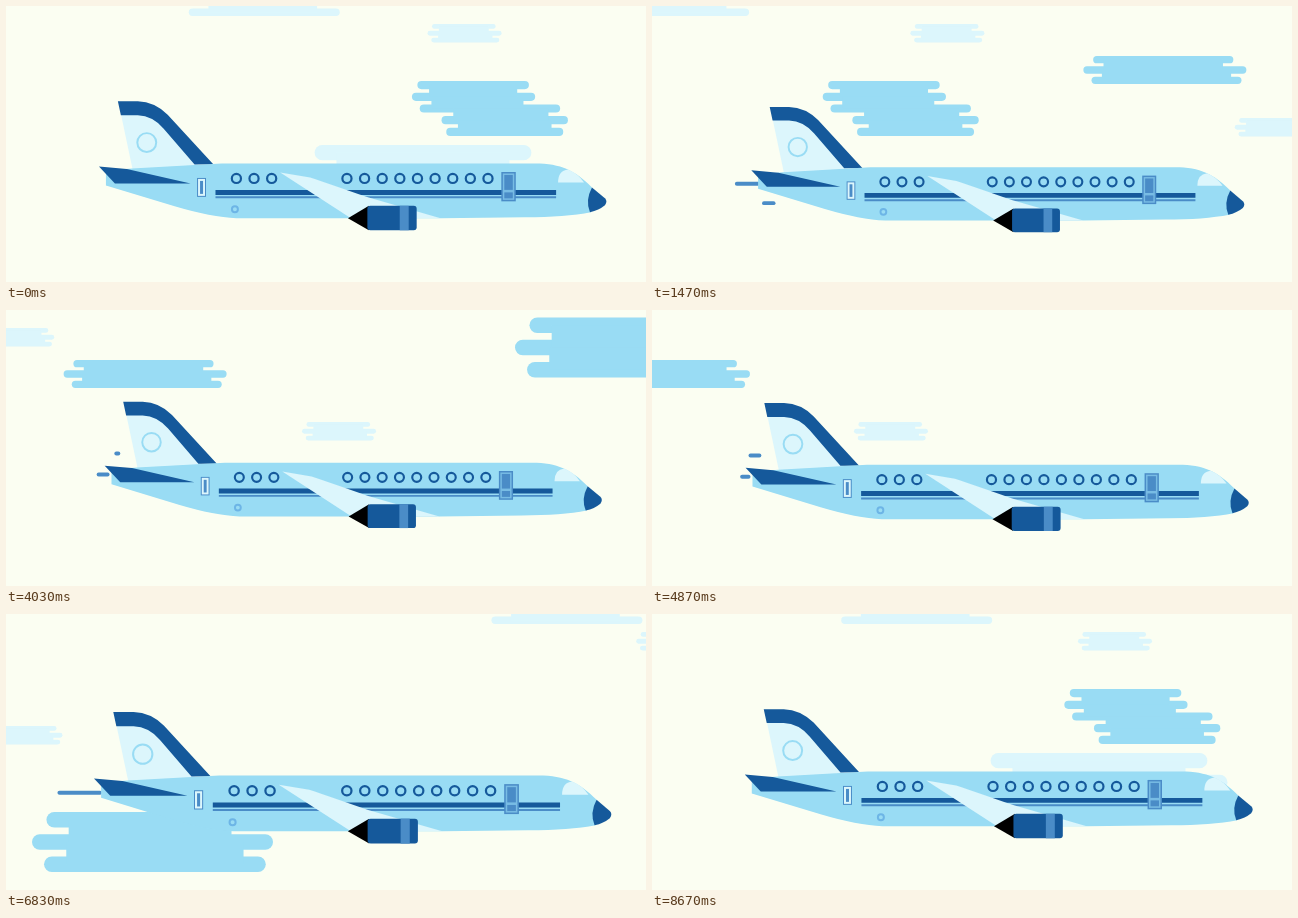
These frames come from a looping animation (640x276 px, 8710 ms). An HTML page with a canvas:

```html
<!DOCTYPE html>
<html>
<head>
<meta charset="utf-8">
<title>Plane in flight</title>
<style>
html, body { margin: 0; width: 100%; height: 100%; overflow: hidden; background: #fbfef2 }
canvas { display: block }
</style>
</head>
<body>
<canvas id="stage" width="640" height="276"></canvas>
<script>
const ctx = document.getElementById('stage').getContext('2d');
const { sin, cos, max, min } = Math;
const LOOP = 8710;
const SKY = '#fbfef2', PALE = '#dcf6fc', LIGHT = '#99dcf4', BLUE = '#4a8cc7', NAVY = '#15599b';

// Cloud rows as [start, end] fractions of the cloud's width
const puff = [[.06, .92], [0, 1], [.05, .97]];
const cap = puff.slice(0, 2);
const stack = [[.035, .75], [0, .79], [.05, .95], [.19, 1], [.22, .97]];

// Each cloud enters at the right edge at its time and drifts left at px/ms
const clouds = [
  { rows: cap, y: -8, width: 151, height: 18, color: PALE, enter: 5871, speed: .161 },
  { rows: puff, y: 18, width: 74, height: 18.5, color: PALE, enter: 6743, speed: .111 },
  { rows: puff, y: 112, width: 74, height: 18.5, color: PALE, enter: 960, speed: .112 },
  { rows: stack, y: 75, width: 156, height: 55, color: LIGHT, enter: 7248, speed: .16 },
  { rows: puff, y: 50, width: 163, height: 28, color: LIGHT, enter: 42, speed: .146 },
  { rows: puff, y: 139, width: 252, height: 59, color: PALE, enter: 8249, speed: .75 },
  { rows: puff, y: 7.5, width: 241, height: 60, color: LIGHT, enter: 3900, speed: 1 },
  { rows: puff, y: 198, width: 241, height: 60, color: LIGHT, enter: 6217, speed: 1 }
];

// Air streaks off the tail, each longest at its peak time
const streaks = [
  { peak: 1470, right: 101, y: 174, length: 26 },
  { peak: 2100, right: 117, y: 194, length: 20 },
  { peak: 4300, right: 97, y: 169, length: 14 },
  { peak: 4870, right: 108, y: 147.5, length: 13 },
  { peak: 6830, right: 100, y: 174, length: 44 }
];

const angle = t => 2 * Math.PI * t / LOOP;

function bar(x, y, w, h, r, color) {
  ctx.fillStyle = color;
  ctx.beginPath();
  ctx.roundRect(x, y, w, h, r);
  ctx.fill();
}

function shape(color, d) {
  ctx.fillStyle = color;
  ctx.fill(new Path2D(d));
}

function ring(x, y, r, color, width) {
  ctx.strokeStyle = color;
  ctx.lineWidth = width;
  ctx.beginPath();
  ctx.arc(x, y, r, 0, 7);
  ctx.stroke();
}

// Rounded rows, joined by narrower necks
function drawCloud({ rows, y, width, height, color, enter, speed }, t) {
  const left = 640 - speed * ((t - enter + LOOP) % LOOP);
  const pitch = height / (rows.length - .3), thick = pitch * .7;
  rows.forEach(([a, b], i) => {
    const top = y + i * pitch;
    bar(left + a * width, top, (b - a) * width, thick, thick / 2, color);
    if (!i) return;
    const [c, d] = rows[i - 1];
    const from = max(a, c) * width + pitch, to = min(b, d) * width - pitch;
    bar(left + from, top - pitch + thick / 2, to - from, pitch, 0, color);
  });
}

function drawStreak({ peak, right, y, length }, t) {
  const w = length * max(0, 3 * cos(angle(t - peak)) - 2);
  bar(right - w, y - 2, w, 4, 2, BLUE);
}

// Drift and zoom about the middle of the plane
function placePlane(t) {
  const a = angle(t);
  const zoom = .988 - .0262 * sin(a - .31) - .003 * sin(2 * a);
  const dx = sin(a) - 1.5 * sin(2 * a);
  const dy = .9 + 2.77 * cos(a + .45) + 3.16 * sin(2 * a - 1.25);
  ctx.translate(330 + dx, 184 + dy);
  ctx.scale(zoom, zoom);
  ctx.translate(-330, -184);
}

function drawPlane(t) {
  ctx.save();
  placePlane(t);
  for (const s of streaks) drawStreak(s, t);

  // Fin
  shape(PALE, 'M114 107H131Q147 108 158 120L193 160L126 164Z');
  shape(NAVY, 'M111 94.5H131Q148 95 161 108L207 158H188L157 122Q146 109 131 108.5H114Z');
  ring(140, 136, 9.5, LIGHT, 2);

  // Body, windshield, nose and tailplane
  shape(LIGHT, 'M99 164L125 162L215 157H530C556 157 570 164 587 181L586 206Q560 211 520 211L435 212H230Q205 211 168 200L99 179Z');
  shape(PALE, 'M553 176Q553 164 563 163Q573 167 579 176Z');
  shape(NAVY, 'M587 181L600 192Q603 195 600 199Q594 204 585 206Q580 194 587 181Z');
  shape(NAVY, 'M92 160L120 162.5L184 177H108Z');

  // Stripes and windows
  bar(209, 183.5, 342, 5, 0, NAVY);
  bar(209, 190, 342, 2, 0, BLUE);
  for (let i = 0; i < 3; i++) ring(230 + i * 17.7, 172, 4.6, NAVY, 2.2);
  for (let i = 0; i < 9; i++) ring(341 + i * 17.7, 172, 4.6, NAVY, 2.2);
  ring(228.5, 203, 3, '#6db5e6', 2);

  // Doors
  bar(190.5, 171.5, 9, 19, 0, BLUE);
  bar(191.5, 172.5, 7, 17, 0, PALE);
  bar(193.5, 174.5, 3, 13, 0, BLUE);
  bar(496, 165.5, 14.5, 29.5, 0, BLUE);
  bar(497.5, 167, 11.5, 26.5, 0, '#78bce4');
  bar(499, 168.5, 8.5, 15, 0, BLUE);
  bar(499, 186, 8.5, 6, 0, BLUE);

  // Wing and engine
  shape(PALE, 'M274 166L304 171Q325 178 362 191L435 212H345Z');
  shape('#000', 'M342 212L363 199.5V224Z');
  bar(361.5, 199.5, 49.5, 24.5, 3, NAVY);
  bar(394, 199.5, 9, 24.5, 0, BLUE);
  ctx.restore();
}

function frame() {
  const t = performance.now() % LOOP;
  ctx.fillStyle = SKY;
  ctx.fillRect(0, 0, 640, 276);
  for (const c of clouds) drawCloud(c, t);
  drawPlane(t);
  requestAnimationFrame(frame);
}
frame();
</script>
</body>
</html>
```
